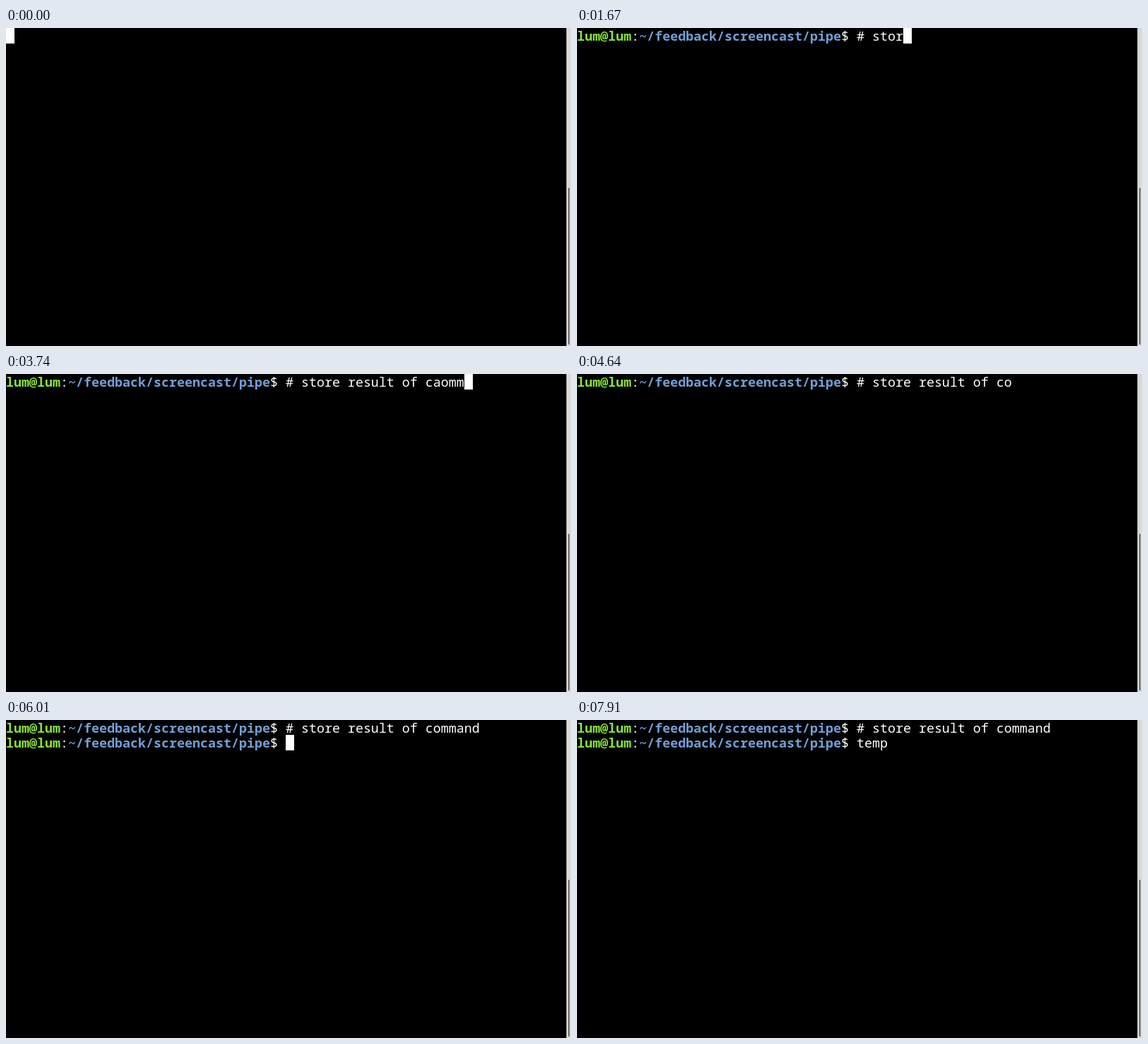
Recreate the animation shown at these times as an HTML page. Size 800x450 px, loop 8000 ms.

```html
<!DOCTYPE html>
<html lang="en">
<head>
<meta charset="utf-8">
<title>Terminal</title>
<style>
  html, body { margin: 0; width: 100%; height: 100%; overflow: hidden; background: #000; }
  #stage { position: relative; width: 800px; height: 450px; overflow: hidden; background: #000; }
  .line {
    position: absolute; left: 0; height: 22px;
    font: 18.333px/22px "Noto Sans Mono", "DejaVu Sans Mono", monospace;
    font-variant-ligatures: none;
    white-space: pre; color: #fff;
  }
  .line b { font-weight: 600; }
  .user { color: #8ae234; }
  .path { color: #729fd8; }
  #cursor { position: absolute; width: 12px; height: 22px; background: #fff; }
  #track { position: absolute; left: 793px; top: 0; width: 7px; height: 450px; background: #dad9d8; box-sizing: border-box; border-left: 1px solid #777; }
  #thumb { position: absolute; left: 2px; top: 226px; width: 2px; height: 222px; border-radius: 1px; background: #686868; }
</style>
</head>
<body>
<div id="stage">
  <div id="cursor"></div>
  <div id="track"><div id="thumb"></div></div>
</div>
<script>
  const LOOP = 8000, CELL = 11, ROW = 21;
  const PROMPT_AT = 200, PROMPT_CELLS = 36;
  const BLINK = 1200, BLINK_SHIFT = 60;

  // [start ms, ms per key, keys]; "<" is backspace, "\n" is enter
  const BURSTS = [
    [1150, 98, "# store resul"],
    [2510, 130, "t of caomm"],
    [3950, 130, "<<<<"],
    [4520, 0, "o"],
    [4710, 130, "mmand"],
    [5650, 0, "\n"],
    [7250, 180, "temp"]
  ];
  const keys = BURSTS.flatMap(([start, step, text]) =>
    [...text].map((key, i) => ({ at: start + i * step, key })));

  const stage = document.getElementById("stage");
  const cursor = document.getElementById("cursor");

  function makeLine(row) {
    const el = document.createElement("div");
    el.className = "line";
    el.style.top = row * ROW + "px";
    el.innerHTML = '<b class="user">lum@lum</b>:<b class="path">~/feedback/screencast/pipe</b>$ <span></span>';
    stage.insertBefore(el, cursor);
    return { el, input: el.querySelector("span") };
  }
  const lines = [makeLine(0), makeLine(1)];

  function typedAt(t) {
    const rows = t < PROMPT_AT ? [] : [""];
    for (const { at, key } of keys) {
      if (at > t) break;
      const last = rows.length - 1;
      if (key === "\n") rows.push("");
      else if (key === "<") rows[last] = rows[last].slice(0, -1);
      else rows[last] += key;
    }
    return rows;
  }

  function draw(t) {
    const rows = typedAt(t);
    lines.forEach(({ el, input }, i) => {
      const shown = i < rows.length;
      el.style.visibility = shown ? "visible" : "hidden";
      const text = shown ? rows[i] : "";
      if (input.textContent !== text) input.textContent = text;
    });
    const row = Math.max(0, rows.length - 1);
    const col = rows.length ? PROMPT_CELLS + rows[row].length : 0;
    cursor.style.left = col * CELL + "px";
    cursor.style.top = row * ROW + "px";
    const lit = (t + BLINK_SHIFT) % BLINK < BLINK / 2;
    cursor.style.visibility = lit ? "visible" : "hidden";
  }

  const begin = performance.now();
  function tick() {
    draw((performance.now() - begin) % LOOP);
    requestAnimationFrame(tick);
  }
  tick();
</script>
</body>
</html>
```
